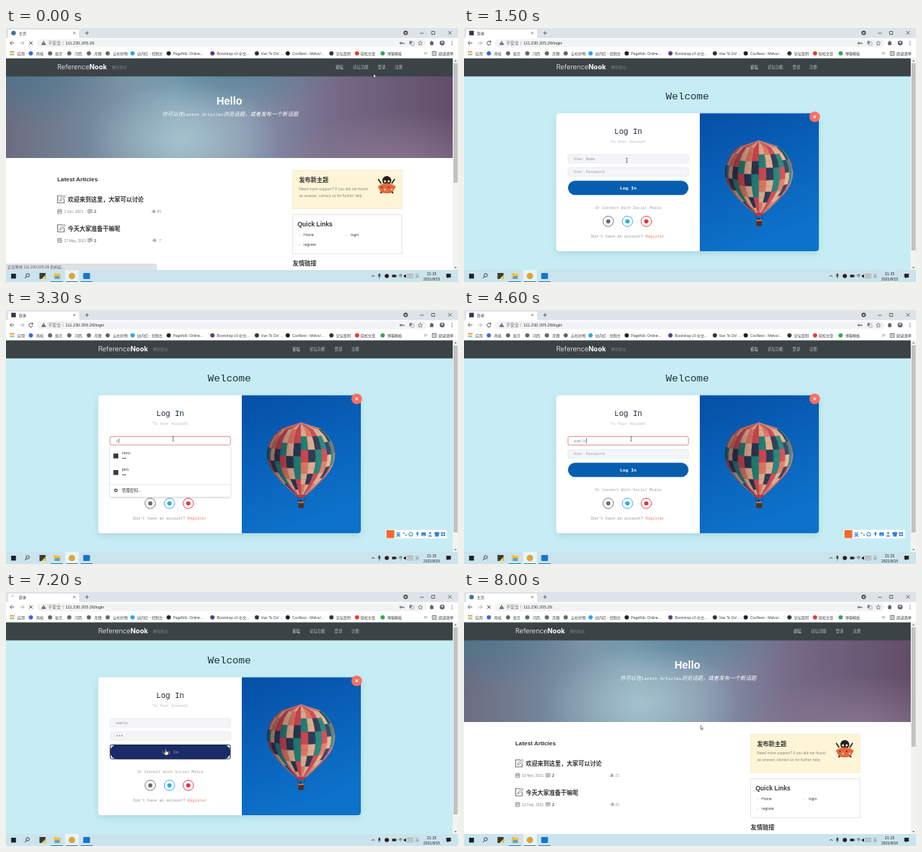
Animation of 600x338 px, one loop 8.1 s. Source, as an HTML page:

```html
<!DOCTYPE html>
<html lang="zh">
<head>
<meta charset="utf-8">
<title>Forum login</title>
<style>
html, body { margin: 0; width: 100%; height: 100%; overflow: hidden; background: #fff; }
svg { display: block; width: 100vw; height: 100vh; }
text { font-family: "Liberation Sans", "Noto Sans CJK SC", "Noto Sans CJK", sans-serif; white-space: pre; }
.b { font-weight: 700; }
.m { font-family: "Liberation Mono", "Noto Sans CJK SC", monospace; }
.brand { font-family: Inter, "Open Sans", sans-serif; }
.mid { text-anchor: middle; }
.end { text-anchor: end; }
.i { font-style: italic; }
</style>
</head>
<body>
<svg id="stage" viewBox="0 0 600 338" preserveAspectRatio="none"></svg>
<script>
const text = (x, y, s, size, fill = '#444', cls = '') =>
  `<text x="${x}" y="${y}" font-size="${size}" fill="${fill}" class="${cls}">${s}</text>`;
const rect = (x, y, w, h, fill, more = '') =>
  `<rect x="${x}" y="${y}" width="${w}" height="${h}" fill="${fill}" ${more}/>`;
const dot = (x, y, r, fill, more = '') =>
  `<circle cx="${x}" cy="${y}" r="${r}" fill="${fill}" ${more}/>`;
const line = (d, color = '#555', w = .8, more = '') =>
  `<path d="${d}" fill="none" stroke="${color}" stroke-width="${w}" ${more}/>`;
const shape = (d, fill, more = '') => `<path d="${d}" fill="${fill}" ${more}/>`;
const group = (id, body, more = '') => `<g id="${id}" ${more}>${body}</g>`;
const IP = '111.230.205.26';

const defs = `<defs>
  <linearGradient id="heroBase">
    <stop offset="0" stop-color="#6d6c80"/><stop offset=".18" stop-color="#73869a"/>
    <stop offset=".38" stop-color="#83a5b5"/><stop offset=".53" stop-color="#8496ab"/>
    <stop offset=".73" stop-color="#766b88"/><stop offset="1" stop-color="#624d69"/>
  </linearGradient>
  <radialGradient id="glow"><stop offset="0" stop-color="#b3cdd8" stop-opacity=".7"/><stop offset="1" stop-color="#b3cdd8" stop-opacity="0"/></radialGradient>
  <radialGradient id="teal"><stop offset="0" stop-color="#3f7790" stop-opacity=".6"/><stop offset="1" stop-color="#3f7790" stop-opacity="0"/></radialGradient>
  <radialGradient id="mauve"><stop offset="0" stop-color="#9b86a0" stop-opacity=".6"/><stop offset="1" stop-color="#9b86a0" stop-opacity="0"/></radialGradient>
  <linearGradient id="sky" x2=".35" y2="1"><stop offset="0" stop-color="#054fa6"/><stop offset="1" stop-color="#0d72ca"/></linearGradient>
  <linearGradient id="shade"><stop offset="0" stop-color="#1c0c20" stop-opacity=".5"/><stop offset=".45" stop-color="#1c0c20" stop-opacity=".1"/><stop offset="1" stop-color="#fff" stop-opacity=".12"/></linearGradient>
  <clipPath id="heroBox"><rect y="64" width="593" height="109"/></clipPath>
  <filter id="soft" x="-10%" y="-10%" width="120%" height="130%"><feDropShadow dx="0" dy="1" stdDeviation="1.2" flood-opacity=".25"/></filter>
  <filter id="lift" x="-10%" y="-10%" width="120%" height="125%"><feDropShadow dx="0" dy="3" stdDeviation="5" flood-color="#4a7f92" flood-opacity=".22"/></filter>
</defs>`;

function browser() {
  const marks = [
    [33, '#3569d8', 40, '南枝'], [58.5, '#666', 65, '拾贝'], [84, '#666', 91, '河西'],
    [110, '#666', 117, '月鹿'], [135, '#666', 142, '云杉好物'], [168, '#2aa5e8', 174, '站内信 - 控制台'],
    [216, '#222', 221.5, 'PageNib: Online...'], [274, '#563d7c', 280, 'Bootstrap v3 中文...'],
    [333, '#333', 338.5, 'Vue To Do! ...'], [374, '#1b1f23', 380, 'CoxNest - Melvo/...'],
    [432, '#333', 438, '论坛案例'], [466, '#e33b30', 470.5, '轻松文案'], [500, '#2fa84f', 506, '博客模板']
  ];
  const apps = ['#e94335', '#fbbc05', '#34a853'].map((c, i) =>
    [0, 1, 2].map(j => rect(5.5 + j * 2, 30.8 + i * 2, 1.4, 1.4, c)).join('')).join('');
  return rect(0, 0, 600, 14, '#dee3e9') +
    shape('M1 14Q3 14 3 11V4Q3 2 5 2H95Q97 2 97 4V11Q97 14 99 14Z', '#fff') +
    group('homeIcon', dot(10, 6.7, 3, '#486f9c')) +
    group('loginIcon', rect(7, 3.7, 6, 6, '#333b40')) +
    group('spinner', line('M8 6.7a2.3 2.3 0 0 1 2.3-2.3', '#7d8790')) +
    '<text id="tabName" x="17" y="8.6" font-size="5" fill="#444"/>' +
    line('M89.2 5.2l3 3m0-3l-3 3', '#555', .7) + line('M105 6.7h5m-2.5-2.5v5') +
    dot(530.5, 6.5, 3, '#555') + shape('M529 6h3l-1.5 2z', '#fff') +
    line('M549.5 7h5M565 4.5h4v4h-4zM587 4.2l4.5 4.5m0-4.5l-4.5 4.5', '#333', .7) +
    rect(0, 13.5, 600, 27, '#fff') + rect(41, 15, 517, 10.5, '#f1f3f4', 'rx="5"') +
    line('M11 20H5.5m2.5-2.6L5.4 20 8 22.6', '#555', .9) +
    line('M18.5 20H24m-2.5-2.6L24.1 20l-2.6 2.6', '#aaa', .9) +
    group('stop', line('M30.8 17.8l4.5 4.5m0-4.5l-4.5 4.5', '#444', .9)) +
    group('reload', line('M35.2 18.6a2.6 2.6 0 1 0 .4 2.2M35.5 17v2h-2', '#444', .9)) +
    shape('M46.7 22.6l3.3-5.6 3.3 5.6z', '#5f6368') + rect(49.7, 18.9, .7, 1.8, '#fff') +
    text(56, 22, '不安全', 5.6, '#666') + rect(75, 17.5, .6, 5, '#aaa') +
    '<text id="url" x="79" y="22.2" font-size="5.6" fill="#333"/>' +
    dot(524, 20.2, 1.1, 'none', 'stroke="#444" stroke-width=".9"') + line('M525 20.2h3.3v1.3', '#444', .9) +
    rect(535.5, 17.3, 3.7, 4.2, '#7a8288') + rect(538, 19, 3.5, 4, '#fff', 'stroke="#7a8288" stroke-width=".6"') +
    line('M550 17.2l.9 2 2.1.2-1.6 1.4.5 2.1-1.9-1.1-1.9 1.1.5-2.1-1.6-1.4 2.1-.2z', '#555', .6) +
    rect(562.8, 18.3, 4.6, 4.4, '#5f6368', 'rx=".6"') + dot(565, 18, 1, '#5f6368') +
    dot(579, 20, 3.3, '#6f6a78') + dot(579, 19, 1.2, '#ded5cf') +
    [17.8, 20, 22.2].map(y => dot(592, y, .6, '#444')).join('') +
    apps + text(15, 35.6, '应用', 5) +
    marks.map(([x, c, tx, s]) => dot(x, 33.7, 2.8, c) + text(tx, 35.5, s, 4.95)).join('') +
    line('M555 32l1.5 1.7-1.5 1.7m2-3.4l1.5 1.7-1.5 1.7', '#555', .6) +
    rect(566, 31.3, 5, 5, 'none', 'stroke="#555" stroke-width=".8"') + line('M567 33h3m-3 1.6h3', '#555', .5) +
    text(574, 35.6, '阅读清单', 5, '#333');
}

const scrollbar = thumbHeight => rect(593, 40, 7, 282, '#f3f3f3') +
  rect(594, 47, 5.5, thumbHeight, '#c1c1c1') +
  shape('M595 44.5l1.7-2 1.7 2z', '#777') + shape('M595 318l1.7 2 1.7-2z', '#777');

function siteHeader(brandX, navX, loginId) {
  return rect(0, 40.4, 593, 24, '#3b4347') +
    `<text x="${brandX}" y="55" font-size="9" fill="#fff" class="brand"><tspan font-weight="300">Reference</tspan><tspan font-weight="700">Nook</tspan></text>` +
    text(brandX + 73, 54, '解忧驿站', 4.8, '#7c8488') +
    text(navX, 54, '论坛', 5.2, '#fff') + text(navX + 23, 54, '论坛功能', 5.2, '#b9bec0') +
    group(loginId, `<text x="${navX + 56}" y="54" font-size="5.2">登录</text>`, 'fill="#b9bec0"') +
    text(navX + 78.5, 54, '注册', 5.2, '#b9bec0');
}

function article(y, title, key) {
  const thumb = x => shape(`M${x} ${y + 15}h1v3h-1zm1.5 0l1-2 .8.3-.2 1.5h1.7l-.5 3.2h-2.8z`, '#aaa');
  return line(`M75 ${y - 4.7}h-6.4v9.4h8.6v-5.2`, '#777', 1.1) + line(`M71.3 ${y + 2}l.5-2 5.3-5.3 1.5 1.5-5.3 5.3z`, '#777', .9) +
    text(82, y + 3, title, 7.75, '#333', 'b') +
    line(`M68.7 ${y + 13.8}h5v5.2h-5zm0 1.6h5m-3.7-2.6v1.6m2.4-1.6v1.6m-3.4 2.5h4.4`, '#888', .8) +
    `<text id="${key}Date" x="77" y="${y + 18}" font-size="4.9" fill="#888"/>` +
    line(`M108.8 ${y + 13.7}h5.4v3.8h-2.5l-1.4 1.5v-1.5h-1.5zm1 1.3h3.4m-3.4 1.2h3.4`, '#888', .8) +
    text(117, y + 18, '2', 5, '#555', 'b') + thumb(key === 'a' ? 193.7 : 194.5) +
    `<text id="${key}Like" x="206" y="${y + 18}" font-size="4.9" fill="#999" class="end"/>`;
}

function homePage() {
  const helper = dot(505.5, 203, 6, '#28211f') + shape('M493.5 211Q505.5 202 517.5 211L513 219Q505.5 221 498 219Z', '#e5683f') +
    line('M498 207l-4-6m18 6l4-6M499 218l-2 2m15-2l2 2', '#28211f', 1.6) +
    dot(503, 204, 1.5, '#f3e6d2') + dot(508, 204, 1.5, '#f3e6d2') +
    [499, 503, 508, 512].map((x, i) => dot(x, 212 + i % 2 * 3, 1.2, i % 2 ? '#f6d9a5' : '#a32e27')).join('');
  const link = (x, y, s) => text(x - 6.5, y, '›', 5, '#aaa') + text(x, y, s, 5.1, '#444');
  return rect(0, 64, 593, 258, '#fff') +
    `<g clip-path="url(#heroBox)">${rect(0, 64, 593, 109, 'url(#heroBase)')}
      <ellipse cx="20" cy="62" rx="130" ry="70" fill="url(#teal)"/>
      <ellipse cx="300" cy="55" rx="140" ry="60" fill="url(#teal)"/>
      <ellipse cx="235" cy="148" rx="130" ry="75" fill="url(#glow)"/>
      <ellipse cx="530" cy="180" rx="170" ry="70" fill="url(#mauve)"/></g>` +
    siteHeader(68, 437.5, 'homeLogin') +
    text(296.5, 101.5, 'Hello', 14, '#fff', 'b mid') +
    `<text x="297.5" y="117.2" font-size="7.1" fill="#fff" class="m i mid">你可以在<tspan font-size="5.9">Latest Articles</tspan>浏览话题，或者发布一个新话题</text>` +
    text(68, 204.3, 'Latest Articles', 7.85, '#333', 'b') +
    article(228, '欢迎来到这里，大家可以讨论', 'a') + article(266.5, '今天大家准备干嘛呢', 'b') +
    rect(380.5, 189.5, 145, 51, '#fdf5d6', 'stroke="#f2e7c2" stroke-width=".7"') +
    text(389, 204.8, '发布新主题', 7.8, '#333', 'b') +
    text(389, 216.3, 'Need more support? If you did not found', 5.08, '#888') +
    text(389, 225, 'an answer, contact us for further help', 5.08, '#888') + helper +
    rect(380.5, 248.5, 145, 52, '#fff', 'stroke="#ddd" stroke-width=".7"') +
    text(387, 263.5, 'Quick Links', 8.2, '#333', 'b') +
    link(395, 277.2, 'Home') + link(457.5, 277.2, 'login') + link(395, 290, 'register') +
    text(380.5, 316.3, '友情链接', 7.9, '#333', 'b') +
    scrollbar(159);
}

// Patchwork balloon: narrow gores and colour bands wrapped on a tapering profile.
function balloon() {
  const cx = 391.5, rows = 12, gores = 14;
  const [red, cream, green, navy, orange] = ['#d8474f', '#efb48f', '#1f8577', '#27384f', '#ec7a62'];
  const bands = [[red, orange, cream], [red, cream, orange], [navy, green, cream], [green, red, navy], [green, orange, cream], [red, cream, navy]];
  const half = u => u < .45 ? 45 * Math.sqrt(1 - ((.45 - u) / .45) ** 2) : 7 + 38 * Math.cos((u - .45) / .55 * Math.PI / 2);
  const pt = (i, j) => {
    const a = (i / gores - .5) * Math.PI, u = j / rows;
    return `${(cx + half(u) * Math.sin(a)).toFixed(1)} ${(150 + 96 * u + 5 * Math.cos(a) * Math.sin(Math.PI * u)).toFixed(1)}`;
  };
  let out = '', edge = [];
  for (let j = 0; j < rows; j++) for (let i = 0; i < gores; i++) {
    const band = bands[Math.floor(j / 2 + i / 7) % bands.length], color = band[i % 3];
    out += shape(`M${pt(i, j)}L${pt(i + 1, j)} ${pt(i + 1, j + 1)} ${pt(i, j + 1)}Z`, color, `stroke="${color}" stroke-width=".3"`);
  }
  for (let j = 0; j <= rows; j++) edge.push(pt(0, j));
  for (let j = rows; j >= 0; j--) edge.push(pt(gores, j));
  return out + shape('M' + edge.join('L') + 'Z', 'url(#shade)') +
    shape('M385 246h13l-2.5 4h-8z', '#a93d4c') + line('M387 249l1.5 7m8-7l-1.5 7', '#30242a', .6) +
    rect(388, 255.5, 7.5, 8, '#4d3028', 'rx="1"') + rect(388, 255, 7.5, 2, '#b5764c') + dot(391, 253.8, 1.3, '#211d2b');
}

function loginPage() {
  const social = [[191.5, '#6b6b6b'], [217, '#2aa9e0'], [242, '#e0383f']];
  return rect(0, 64, 593, 258, '#c7edf4') + siteHeader(122.5, 380, 'loginNav') +
    text(296.5, 94.8, 'Welcome', 13.7, '#1f2d38', 'm mid') +
    rect(122.5, 113.5, 348.5, 183.5, '#fff', 'rx="4" filter="url(#lift)"') +
    shape('M313 113.5H467Q471 113.5 471 117.5V293Q471 297 467 297H313Z', 'url(#sky)') + balloon() +
    dot(465.5, 118.3, 7, '#fb6f60') + line('M463.9 116.7l3.2 3.2m0-3.2l-3.2 3.2', '#fff', 1.1) +
    text(218, 140.8, 'Log In', 10.3, '#1f2d38', 'm mid') + text(218, 153.3, 'To Your Account', 5.23, '#aebbc1', 'm mid') +
    '<rect id="field1" x="138" y="168.3" width="160" height="11.5" rx="2"/><text id="user" x="146" y="176" font-size="5.23" class="m"/>' +
    '<rect id="field2" x="138" y="185.8" width="160" height="11.5" rx="2"/><text id="pass" x="146" y="193.4" font-size="5.23" class="m"/>' +
    '<rect id="caret" width=".6" height="6.5" fill="#333"/>' +
    '<rect id="button" x="138" y="203.2" width="160" height="19" rx="9.5"/>' +
    group('ring', rect(138.3, 203.5, 159.4, 18.5, 'none', 'rx="2" stroke="#18203f" stroke-width="1"')) +
    '<text id="submit" x="218" y="215.2" font-size="6.1" class="m mid">Log In</text>' +
    text(218, 241.3, 'Or Connect With Social Media', 5.23, '#98a4aa', 'm mid') +
    social.map(([x, c]) => dot(x, 257.3, 6.9, '#fff', `stroke="${c}" stroke-width=".9"`) + dot(x, 257.3, 2.8, c)).join('') +
    text(169, 279.2, "Don't have an account?", 5.23, '#8c989e', 'm') + text(241, 279.2, 'Register', 5.23, '#fb7868', 'm') +
    scrollbar(249);
}

function suggestions() {
  const row = (y, name) => rect(142.5, y, 6.5, 6.5, '#343b40') + text(154, y + .8, name, 5.4, '#333') + text(154, y + 8.2, '•••', 5.4, '#333');
  return rect(138, 180.5, 160, 68, '#fff', 'rx="1.5" filter="url(#soft)"') +
    group('picked', rect(137, 185.2, 160, 19, '#c2dfe8', 'rx="9.5"')) + row(191, 'noru') + row(213, 'pim') + rect(138, 232, 160, .6, '#ddd') +
    dot(145.8, 240, 1.7, 'none', 'stroke="#444" stroke-width="1.2"') + text(154, 242, '管理密码...', 5.3, '#333');
}

function inputBar() {
  const c = '#2f7fd6';
  return rect(504, 292.5, 81.5, 11.5, '#fff', 'rx="1.5" stroke="#dde5ea" stroke-width=".5"') +
    rect(505, 293, 10.5, 10.5, '#f26a2e', 'rx="1"') + text(517.8, 300.8, '英', 6.2, c, 'b') +
    dot(528, 297, .9, c) + dot(531, 299.5, .9, c) +
    dot(537.3, 298.5, 2.6, 'none', `stroke="${c}"`) + line('M536 299q1.3 1.3 2.6 0', c, .6) +
    rect(545, 295.2, 2.4, 4.4, c, 'rx="1.2"') + line('M546.2 299.5v2', c) +
    rect(551.3, 296, 6, 4.8, c, 'rx=".7"') + line('M552.5 299.4h3.6', '#fff', .6) +
    dot(563, 296.8, 1.4, c) + shape('M560.3 301.5q2.7-4 5.4 0z', c) +
    shape('M569.5 295.5h5l1.3 2-1.3.8v3.2h-5v-3.2l-1.3-.8z', c) +
    [0, 1, 2, 3].map(i => rect(577.5 + i % 2 * 3, 295.6 + (i >> 1) * 3, 2.3, 2.3, c)).join('');
}

function taskbar() {
  return rect(0, 322, 600, 16, '#cbe3ec') + rect(78.5, 322, 18, 16, '#e9f4f8') +
    rect(6.8, 327, 6.4, 6.4, '#15242c') +
    dot(28.8, 329, 2.2, 'none', 'stroke="#222" stroke-width=".8"') + line('M27.2 330.7l-2.2 2.4', '#222', .9) +
    rect(44.5, 326, 8, 8, '#393a34') + shape('M47 334h5.5v-5.5z', '#f2d432') +
    shape('M63.5 326h3.5l1 1h4.5v7h-9z', '#f5bf43') + rect(65, 330, 6, 4, '#53a6d8') +
    dot(87.5, 330, 4.3, '#d9a63a') + rect(102.5, 326, 9, 8, '#1677c8', 'rx="1"') +
    [59.5, 79.5, 99].map(x => rect(x, 337, 16, 1, '#2a80b8')).join('') +
    line('M485.3 331l2-2 2 2', '#222', .8) + rect(494.5, 326.8, 2.2, 4, '#333', 'rx="1"') + line('M493.6 330q2 2.6 4 0m-2 1.5v2', '#333', .6) +
    dot(505.5, 330, 2.8, '#2a2022') + rect(512.5, 328.3, 5.2, 3.4, '#222') + rect(518, 329.3, .8, 1.4, '#222') +
    line('M521.5 329q2.3-2 4.6 0m-3.8 1.4q1.5-1.2 3 0m-1.5 1.3v.7', '#222', .7) + shape('M528 329h1.3l1.7-1.6v5.4l-1.7-1.6H528z', '#222') +
    rect(533, 327.2, 7, 5.6, '#dbe7ec', 'stroke="#777" stroke-width=".5"') + line('M534 329h5m-5 1.6h5', '#666', .5) +
    text(543, 332, '英', 5.6, '#7f8a90') + text(565, 328.7, '21:15', 5, '#222', 'mid') + text(565, 336, '2021/8/15', 5, '#222', 'mid') +
    shape('M584.5 327h6v5h-3l-1.5 1.5V332h-1.5z', '#222');
}

const white = 'fill="#fff" stroke="#222" stroke-width=".5"';
const pointers = group('arrow', `<path d="M0 0V5.2L1.2 4.1 2.1 6.1 3 5.7 2.1 3.8H3.7Z" ${white}/>`) +
  group('hand', `<path d="M-.6 0Q0-.8 .6 0V2.6L3.4 3.3V5.7L2.6 7.6H-.8L-2.6 4.6-1.8 4-.6 4.8Z" ${white}/>`) +
  group('beam', line('M-1.2-2.7h.8L0-2.3l.4-.4h.8M0-2.3v4.6m-1.2.4h.8L0 2.3l.4.4h.8', '#222', .6));

document.getElementById('stage').innerHTML = defs + browser() + group('home', homePage()) + group('login', loginPage()) +
  group('popup', suggestions()) + group('ime', inputBar()) +
  group('status', '<rect id="statusBox" x="-2" y="314" height="10" rx="2" fill="#dee2e7" stroke="#c5cacf" stroke-width=".5"/><text id="statusText" x="2" y="320" font-size="5" fill="#555"/>') +
  taskbar() + group('pointer', pointers);

const $ = id => document.getElementById(id);
const show = (id, on) => $(id).style.display = on ? '' : 'none';
const write = (id, s) => { if ($(id).textContent !== s) $(id).textContent = s; };
const set = (id, o) => { for (const k in o) $(id).setAttribute(k, o[k]); };
const within = (t, a, b) => t >= a && t < b;
const typed = (s, t, times) => s.slice(0, times.filter(at => t >= at).length);

// time, x, y
const route = [[0, 488, 61], [400, 495, 52], [1000, 495, 52], [1500, 216, 176], [2300, 216, 176], [3000, 222, 171.5],
  [4900, 222, 171.5], [5300, 214.5, 189], [6300, 214.5, 189], [6700, 212, 209.5], [7400, 212, 209.5], [7900, 314, 177.5], [8100, 314, 177.5]];
function place(t) {
  const i = route.findIndex(p => p[0] > t), a = route[i - 1], b = route[i];
  const k = (t - a[0]) / (b[0] - a[0]), e = k * k * (3 - 2 * k);
  return [a[1] + (b[1] - a[1]) * e, a[2] + (b[2] - a[2]) * e];
}

function draw(t) {
  const onLogin = within(t, 1000, 7500), late = t >= 7500;
  show('home', !onLogin); show('login', onLogin);
  const waiting = within(t, 600, 1000) || within(t, 6900, 7500);
  const busy = t < 1200 || t >= 6900;
  show('stop', busy); show('reload', !busy);
  show('spinner', waiting); show('homeIcon', !onLogin && !waiting); show('loginIcon', onLogin && !waiting);
  write('tabName', within(t, 600, 1000) ? IP + '/login' : onLogin ? '登录' : '主页');
  write('url', within(t, 600, 7500) ? IP + '/login' : IP);
  set('homeLogin', { fill: within(t, 300, 1000) ? '#fff' : '#b9bec0' });

  show('status', t < 1000);
  set('statusBox', { width: t < 200 ? 202 : 54 });
  write('statusText', t < 200 ? `正在等待 ${IP} 的响应...` : t < 600 ? IP + '/login' : '正在等待 111.230.20...');
  write('aDate', late ? '23 Nov, 2021' : '1 Jun, 2021'); write('aLike', late ? '23' : '89');
  write('bDate', late ? '12 Feb, 2021' : '27 May, 2021'); write('bLike', late ? '28' : '7');

  const user = typed('wamlo', t, [3200, 3400, 3600, 3900, 4200]);
  const pass = typed('•••', t, [5700, 5900, 6100]);
  const first = within(t, 2300, 5300), second = within(t, 5300, 6800);
  write('user', user || (first ? '' : 'User Name')); write('pass', pass || (second ? '' : 'User Password'));
  set('user', { fill: '#929ca4' }); set('pass', { fill: pass ? '#555' : '#9ba5ac' });
  const field = (on, ink) => ({ fill: on ? '#fff' : '#f3f5f7', stroke: on ? ink : '#dce2e6', 'stroke-width': on ? .9 : .6 });
  set('field1', field(first, '#dc8183')); set('field2', field(second, '#77738d'));
  const chars = first ? user.length : pass.length;
  show('caret', (first || second) && (chars > 0 && t % 1000 < 900 || t % 1000 < 500));
  set('caret', { x: 146.5 + chars * 3.14, y: first ? 170.8 : 188.3 });

  const hover = Math.max(0, Math.min(1, (t - 6500) / 300));
  const mix = (a, b) => Math.round(a + (b - a) * hover);
  set('button', { fill: `rgb(${mix(8, 25)},${mix(94, 43)},${mix(174, 105)})` });
  set('submit', { fill: hover > .5 ? '#d88b8c' : '#fff', 'font-weight': hover > .5 ? 400 : 700 });
  show('ring', t >= 6900);

  const fade = t < 5800 ? 1 : t < 5900 ? .65 : .3;
  show('popup', within(t, 2300, 3500) || within(t, 5300, 6000));
  set('popup', { opacity: second ? fade : 1, transform: second ? 'translate(1 18)' : '' });
  show('picked', second);
  show('ime', within(t, 2500, 5300));

  const [x, y] = place(t);
  const kind = within(t, 300, 1000) || within(t, 6600, 7500) ? 'hand' : within(t, 1400, 6600) ? 'beam' : 'arrow';
  ['arrow', 'hand', 'beam'].forEach(k => show(k, k === kind));
  set('pointer', { transform: `translate(${x} ${y})` });
}

const start = performance.now();
function tick() {
  draw(Math.floor((performance.now() - start) % 8100 / 100) * 100);
  requestAnimationFrame(tick);
}
tick();
</script>
</body>
</html>
```
